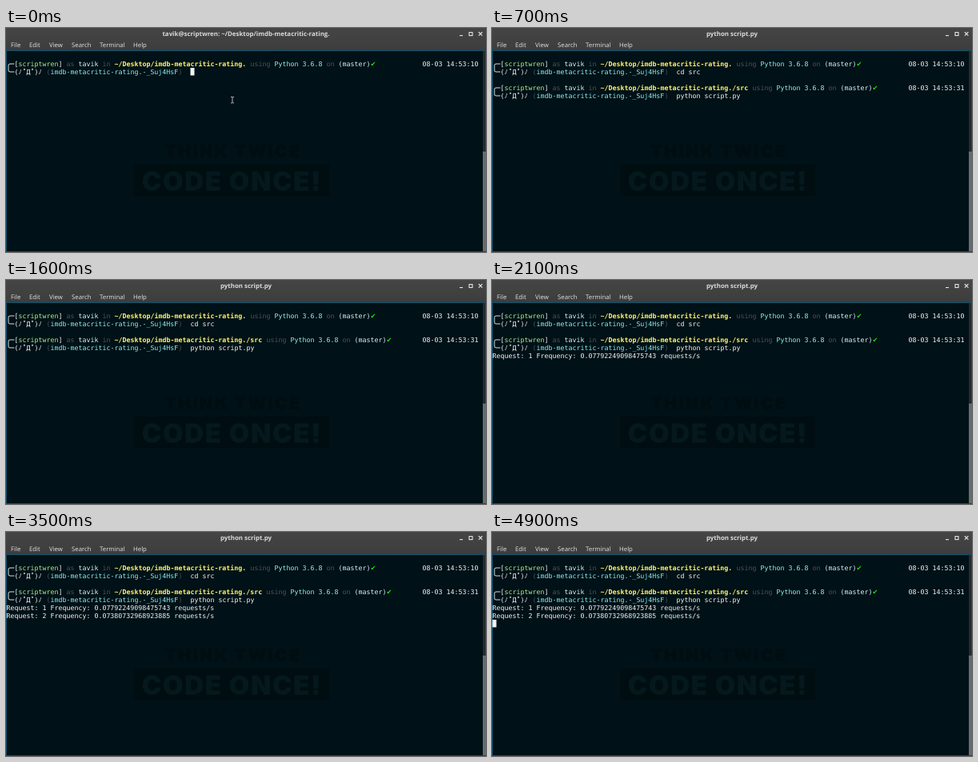
An HTML page that plays this animation: 600x281 px, repeating every 5 s.

```html
<!DOCTYPE html>
<html lang="en">
<head>
<meta charset="utf-8">
<title>Terminal session</title>
<style>
  html, body { margin: 0; width: 100%; height: 100%; overflow: hidden; background: #001117; }
  svg { display: block; width: 600px; height: 281px; }
  text { white-space: pre; text-rendering: geometricPrecision; }
  .ui { font: 7.8px "Open Sans", "Noto Sans", sans-serif; fill: #e2e2e2; }
  #title { font-weight: 700; font-size: 7.9px; fill: #dadada; }
  .mono { font: 8.305px "DejaVu Sans Mono", "Noto Sans Mono", "Noto Sans CJK JP", monospace; }
  .mono.bold { font-weight: 700; }
  .mono.tick { font-family: "DejaVu Sans", sans-serif; }
  .slogan { font-family: Inter, sans-serif; font-weight: 900; }
</style>
</head>
<body>
<svg id="stage" viewBox="0 0 600 281" xmlns="http://www.w3.org/2000/svg">
  <defs>
    <linearGradient id="bar" x2="0" y2="1">
      <stop offset="0" stop-color="#454545"/>
      <stop offset="1" stop-color="#3d3d3d"/>
    </linearGradient>
  </defs>
  <rect width="600" height="281" fill="#001117"/>
  <g class="slogan" text-anchor="middle">
    <text x="284" y="162" font-size="21" letter-spacing="2.4" fill="#000d11">THINK TWICE</text>
    <rect x="160" y="171" width="244" height="40" fill="#000e12"/>
    <text x="282.5" y="204" font-size="33" letter-spacing="1.6" fill="#05191d">CODE ONCE!</text>
  </g>
  <rect width="600" height="28" fill="url(#bar)"/>
  <text id="title" class="ui" x="300" y="10" text-anchor="middle"></text>
  <g id="menu"></g>
  <g fill="none" stroke="#e4e4e4" stroke-width="1.1">
    <path d="M567 9.5h4"/>
    <rect x="579" y="5.5" width="4" height="4"/>
    <path d="M590.8 5l4.6 4.6m0-4.6l-4.6 4.6"/>
  </g>
  <rect x="596" y="28" width="4" height="253" fill="#222b2e"/>
  <rect x=".5" y="28.5" width="599" height="252" fill="none" stroke="#0c4f6e"/>
  <rect x="596" y="155" width="4" height="125" fill="#666c6e"/>
  <g id="screen"></g>
  <rect id="cursor" width="5" height="9.5" fill="#f2f2f2"/>
  <path id="beam" d="M281 86.5h1.2l.8.6.8-.6h1.2M283 87v6.5M281 94h1.2l.8-.6.8.6h1.2" fill="none" stroke="#c4cbcd" stroke-width=".9"/>
</svg>
<script>
const $ = id => document.getElementById(id);
const NS = "http://www.w3.org/2000/svg";
const USER = "tavik", HOST = "scriptwren";
const PROJECT = "imdb-metacritic-rating.", HOME = "~/Desktop/" + PROJECT;
const WHITE = "#f0f4f4", DIM = "#4a5457", GREEN = "#a9ee90", CYAN = "#8ceff0",
      YELLOW = "#fff66c", ICE = "#d2f6f6";
const LOOP = 5000, STEP = 100, BLINK = 370, BLINK_START = 160;
const TYPE_COL = 46;

const add = (parent, x, y, str, cls, fill) => {
  const el = document.createElementNS(NS, "text");
  el.setAttribute("x", x);
  el.setAttribute("y", y);
  el.setAttribute("class", cls);
  if (fill) el.setAttribute("fill", fill);
  el.textContent = str;
  parent.append(el);
  return el;
};
const colX = col => 0.5 + col * 5;
const rowY = row => 40 + row * 10;

// Every character takes one terminal cell.
function line(row, parts, from = 0) {
  const g = document.createElementNS(NS, "g");
  let col = from;
  for (const [str, fill = WHITE, cls = ""] of parts) {
    add(g, colX(col), rowY(row) + 7.8, str, "mono " + cls, fill);
    col += [...str].length;
  }
  $("screen").append(g);
  return g;
}

function corner(g, row, side) {
  const p = document.createElementNS(NS, "path");
  const y = rowY(row) + 5;
  p.setAttribute("d", `M3 ${y + 5 * side}V${y + 2 * side}Q3 ${y} 5 ${y}H10.5`);
  p.setAttribute("fill", "none");
  p.setAttribute("stroke", WHITE);
  p.setAttribute("stroke-width", ".9");
  g.append(p);
}

function prompt(row, path, clock) {
  const top = line(row, [
    ["["], [HOST, GREEN], ["]"], [" as ", DIM], [USER, ICE], [" in ", DIM],
    [path, YELLOW, "bold"], [" using ", DIM], ["Python 3.6.8", CYAN], [" on ", DIM],
    ["(master)", ICE], ["✔", "#1de01d", "tick"]
  ], 2);
  add(top, colX(104), rowY(row) + 7.8, "08-03 " + clock, "mono", WHITE);
  corner(top, row, 1);
  const low = line(row + 1, [
    ["("], ["ﾉ"], ["˚"], ["Д"], ["˚"], [")"], ["ﾉ"], [" (", DIM],
    [PROJECT + "-_Suj4HsF", CYAN], [")", DIM]
  ], 2);
  corner(low, row + 1, -1);
  return [top, low];
}

[["File", 6], ["Edit", 29], ["View", 54], ["Search", 82], ["Terminal", 117], ["Help", 159]]
  .forEach(([name, x]) => add($("menu"), x, 24, name, "ui"));

prompt(0, HOME, "14:53:10");
const second = prompt(3, HOME + "/src", "14:53:31");
const typed = [1, 4].map(row => line(row, [[" "]], TYPE_COL).firstChild);
const output = ["1 Frequency: 0.07792249098475743", "2 Frequency: 0.07380732968923885"]
  .map((s, i) => line(5 + i, [[`Request: ${s} requests/s`]]));

// [start ms, first command, second command (null: no prompt yet), output lines (-1: not running)]
const STATES = [
  [0, "", null, -1],
  [100, "cd", null, -1],
  [200, "cd src", null, -1],
  [300, "cd src", "", -1],
  [500, "cd src", "pytho", -1],
  [600, "cd src", "python script.py", -1],
  [700, "cd src", "python script.py", 0],
  [2000, "cd src", "python script.py", 1],
  [3500, "cd src", "python script.py", 2]
];

const show = (el, on) => el.setAttribute("visibility", on ? "visible" : "hidden");

function draw(t) {
  const [, first, next, lines] = STATES.findLast(s => s[0] <= t);
  const running = lines >= 0, moved = next !== null;
  typed[0].textContent = first;
  typed[1].textContent = next || "";
  second.forEach(g => show(g, moved));
  output.forEach((g, i) => show(g, i < lines));
  $("title").textContent = running ? next : `${USER}@${HOST}: ${HOME}${moved ? "/src" : ""}`;

  const row = running ? 5 + lines : moved ? 4 : 1;
  const col = running ? 0 : TYPE_COL + (moved ? next : first).length;
  $("cursor").setAttribute("x", colX(col));
  $("cursor").setAttribute("y", rowY(row));
  const phase = Math.floor((t - BLINK_START) / BLINK);
  show($("cursor"), t < BLINK_START || t >= 4600 || phase % 2 === 0);
  show($("beam"), t < 100);
}

let last = -1;
function tick(now) {
  const t = Math.floor(now % LOOP / STEP) * STEP;
  if (t !== last) draw(last = t);
  requestAnimationFrame(tick);
}
draw(0);
requestAnimationFrame(tick);
</script>
</body>
</html>
```
